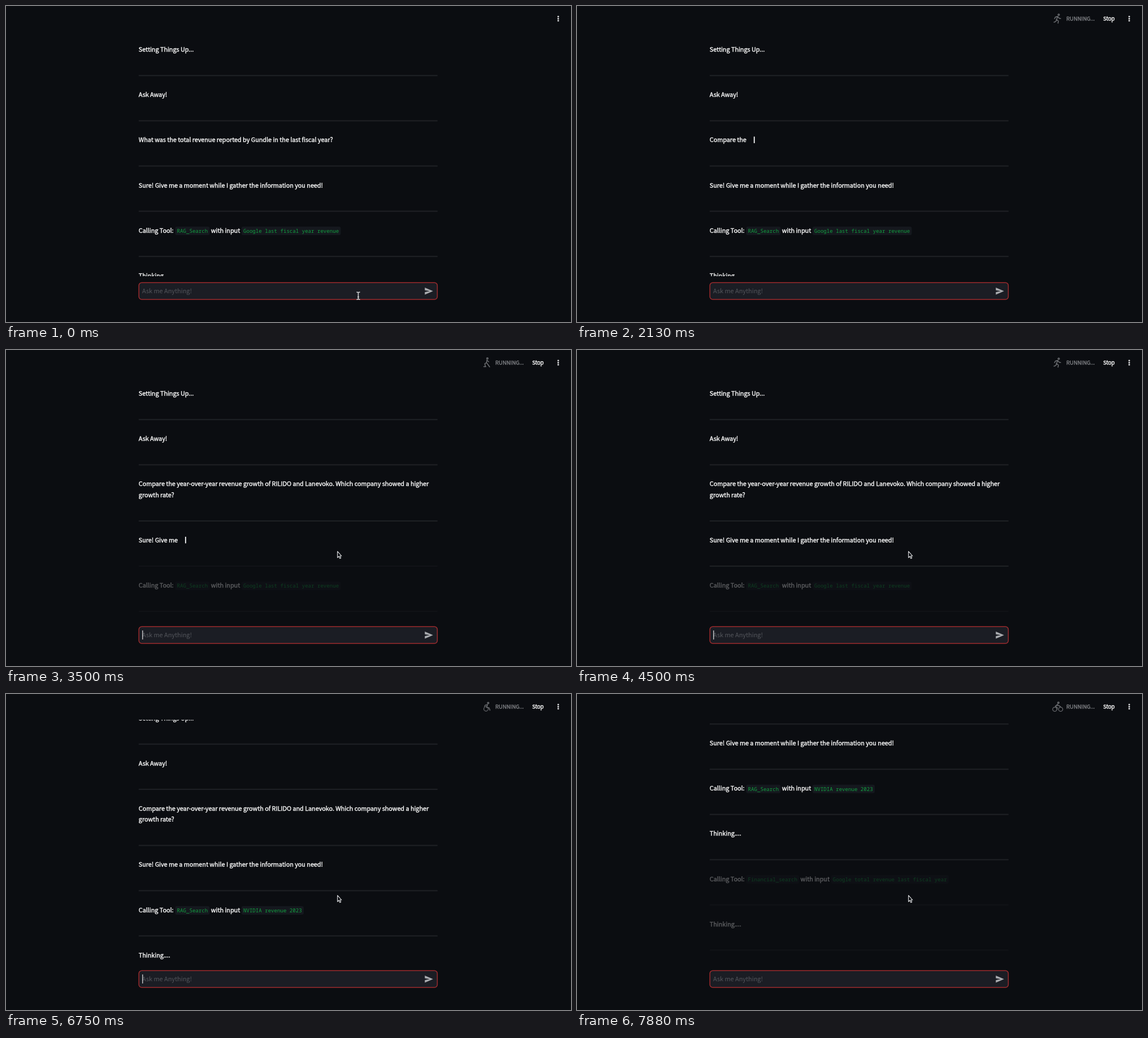
An HTML page for the animation above (8000 ms loop, 1000 by 560 pixels).

```html
<!DOCTYPE html>
<html lang="en">
<head>
<meta charset="utf-8">
<title>Chat stream</title>
<style>
  html, body { margin: 0; width: 100%; height: 100%; overflow: hidden; background: #0b0d11; }
  svg { display: block; width: 1000px; height: 560px; }
  text { font: 10.9px "Noto Sans CJK JP", "Noto Sans CJK SC", "Noto Sans CJK", "Noto Sans", sans-serif; fill: #fafafa; }
  .msg { letter-spacing: -0.06px; stroke: #fafafa; stroke-width: .38px; }
  .code { font: 9.1px "Noto Sans Mono", "DejaVu Sans Mono", monospace; fill: #12a040; }
  .chip { fill: #15181e; }
  .rule { fill: #1f2125; }
  .hint { fill: #54565c; }
  .small { font-size: 9.5px; }
  .state { fill: #85878b; stroke: #85878b; stroke-width: .3px; }
  .icon { fill: none; stroke: #6c6e72; stroke-width: 1.5; stroke-linecap: round; stroke-linejoin: round; }
</style>
</head>
<body>
<svg viewBox="0 0 1000 560">
  <defs><clipPath id="view"><rect id="window" x="0" y="45.7" width="1000" height="433"/></clipPath></defs>
  <rect width="1000" height="560" fill="#0b0d11"/>
  <g id="main">
    <g clip-path="url(#view)"><g id="chat"></g></g>
    <g id="input"></g>
  </g>
  <g id="status">
    <g id="sport" class="icon"></g>
    <text class="small state" x="866" y="26.2">RUNNING...</text>
    <text class="small msg" x="931.3" y="26.2">Stop</text>
  </g>
  <g fill="#d6d7d9">
    <circle cx="977.4" cy="18.7" r="1.5"/><circle cx="977.4" cy="22.4" r="1.5"/><circle cx="977.4" cy="26.1" r="1.5"/>
  </g>
  <g id="beam" fill="none">
    <path d="M-3 -6.5 Q0 -6.5 0 -5 Q0 -6.5 3 -6.5 M0 -5 V5 M-3 6.5 Q0 6.5 0 5 Q0 6.5 3 6.5 M-1.5 2 H1.5" stroke="#c9cacc" stroke-width="1.6"/>
  </g>
  <path id="arrow" d="M586.7 356.8 V368 L589.2 365.7 L590.9 369.6 L592.7 368.8 L591 365 H593.9 Z"
        fill="#0b0d11" stroke="#e2e3e5" stroke-width="1.1" stroke-linejoin="round"/>
</svg>
<script>
const LOOP = 8000, LEFT = 234.8, PITCH = 80.12, LINE = 19.4, WORD = 80, CHAR = 5.46, GAP = 13;
const ASK = 2030, SURE = 3330, CALL = 5400, THINK = 6400;
const SUBMIT = 1500, START = 1880;

const el = id => document.getElementById(id);
const clamp = (v, lo = 0, hi = 1) => Math.min(hi, Math.max(lo, v));
const show = (id, on) => el(id).setAttribute('display', on ? 'inline' : 'none');
const within = (t, a, b) => t >= a && t < b;

const oldAsk = 'What was the total revenue reported by Gundle in the last fiscal year?';
const newAsk = 'Compare the year-over-year revenue growth of RILIDO and Lanevoko. Which company showed a higher growth rate?'.split(' ');
const sure = 'Sure! Give me a moment while I gather the information you need!'.split(' ');
const endAsk = ASK + newAsk.length * WORD;
const endSure = SURE + sure.length * WORD;
const endCall = CALL + 8 * WORD + 20;

const cache = {};
function fill(id, html) {
  if (cache[id] === html) return false;
  el(id).innerHTML = cache[id] = html;
  return true;
}

// words on show at time t for a message streamed from "from"
const count = (t, from) => Math.floor((t - from) / WORD) + 1;
const text = (x, y, s, cls = 'msg', gap = 0) =>
  s ? `<text class="${cls}" x="${x}" y="${y}"${gap ? ` data-gap="${gap}"` : ''}>${s}</text>` : '';
const fade = (op, body) => `<g opacity="${op.toFixed(3)}">${body}</g>`;
const rule = (y, op = 1) => fade(op, `<rect class="rule" x="${LEFT}" y="${y - 1}" width="529" height="2"/>`);

function chip(x, y, s, live) {
  if (!s) return '';
  return `<rect class="chip" x="${x - 3.2}" y="${y - 10.6}" width="${s.length * CHAR + 6.4}" height="15" rx="3"/>` +
    text(x, y + .2, s, 'code', live ? GAP + 3.5 : 0);
}

function toolRow(y, tool, query, n = 99, live = false) {
  const shift = (tool.length - 10) * CHAR;
  const q = query.split(' ');
  const mark = (a, b) => live && within(n, a, b) ? GAP : 0;
  return text(LEFT, y, ['Calling', 'Tool:'].slice(0, n).join(' '), 'msg', mark(1, 3)) +
    chip(302.6, y, n > 2 ? tool : '', mark(3, 4)) +
    text(362.8 + shift, y, ['with', 'input'].slice(0, clamp(n - 3, 0, 2)).join(' '), 'msg', mark(4, 6)) +
    chip(420 + shift, y, q.slice(0, Math.max(0, n - 5)).join(' '), mark(6, 100));
}

function chat(t) {
  const stale = 1 - .67 * clamp((t - 2500) / 1000) ** 2;
  const op = from => t >= from ? 1 : stale;
  const n = count(t, ASK);
  const extra = t >= ASK && n > 14 ? LINE : 0;
  const base = i => 81.2 + i * PITCH + (i > 2 ? extra : 0);
  const line = i => 123.3 + i * PITCH + (i > 1 ? extra : 0);

  let out = text(LEFT, base(0), 'Setting Things Up...') + rule(line(0)) +
    text(LEFT, base(1), 'Ask Away!') + rule(line(1));

  if (t < ASK) out += text(LEFT, base(2), oldAsk);
  else {
    const gap = t < endAsk ? GAP : 0;
    out += text(LEFT, base(2), newAsk.slice(0, Math.min(n, 14)).join(' '), 'msg', n <= 14 ? gap : 0) +
      text(LEFT, base(2) + LINE, newAsk.slice(14, Math.max(14, n)).join(' '), 'msg', gap);
  }
  out += rule(line(2), op(endAsk));

  const said = t >= SURE ? sure.slice(0, count(t, SURE)) : sure;
  out += fade(op(SURE), text(LEFT, base(3), said.join(' '), 'msg', within(t, SURE, endSure) ? GAP : 0)) +
    rule(line(3), op(endSure));

  out += fade(op(CALL), t < CALL
    ? toolRow(base(4), 'RAG_Search', 'Google last fiscal year revenue')
    : toolRow(base(4), 'RAG_Search', 'NVIDIA revenue 2023', count(t, CALL), t < endCall)) +
    rule(line(4), op(endCall));

  out += fade(op(THINK), text(LEFT, base(5), 'Thinking....')) + rule(line(5), op(THINK));
  out += fade(stale, toolRow(base(6), 'Financial_search', 'Google total revenue last fiscal year')) + rule(line(6), stale);
  out += fade(stale, text(LEFT, base(7), 'Thinking....')) + rule(line(7), stale);

  if (!fill('chat', out)) return;
  const tail = el('chat').querySelector('[data-gap]');
  if (!tail) return;
  const x = +tail.getAttribute('x') + tail.getComputedTextLength() + +tail.dataset.gap;
  const y = +tail.getAttribute('y') - 10;
  el('chat').insertAdjacentHTML('beforeend', `<rect x="${x}" y="${y}" width="1.8" height="11.6" fill="#fafafa"/>`);
}

function input(t) {
  const typed = within(t, 880, SUBMIT);
  const grow = within(t, 1250, SUBMIT) ? LINE : 0;
  const caret = !typed && t >= 380 && (t - 380) % 1000 < 500;
  el('window').setAttribute('height', 433 - grow);
  let out = `<rect x="235.2" y="${490.2 - grow}" width="528.2" height="${29.8 + grow}" rx="5" fill="#1b1d24" stroke="#9c2b2e" stroke-width="1.5"/>`;
  if (typed) {
    out += text(241, 509.2 - grow, newAsk.slice(0, 13).join(' '), '');
    if (grow) out += text(241, 509.2, newAsk.slice(13).join(' '), '');
  } else out += text(241, 509.2, 'Ask me Anything!', 'hint');
  if (caret) out += '<rect x="241.2" y="497" width="1.2" height="16" fill="#e4e5e7"/>';
  out += `<path d="M741.3 499 L755.8 505.3 L741.3 511.6 V506.9 L750 505.3 L741.3 503.7 Z" fill="${typed ? '#fafafa' : '#a9abaf'}"/>`;
  fill('input', out);
}

const head = (x, y) => `<circle cx="${x}" cy="${y}" r="1.3"/>`;
const wheel = (x, y, r) => `<circle cx="${x}" cy="${y}" r="${r}" stroke-width="1.2"/>`;
const path = d => `<path d="${d}"/>`;
const sports = {
  R: head(852.6, 15.5) + path('M851 18.6 L848.6 24 L852 26.5 L851.4 30.5 M848.6 24 L847.6 27.4 L844.2 28.8 M851 18.6 L846.8 19.6 L845.2 22.4 M851 18.6 L853.4 21.8 L856 22.2'),
  W: head(853.4, 16) + path('M852.2 18.8 L850.6 23.8 L855 24.6 L856.6 28.8 M852.2 19 L848.2 19.8 L847 22') + wheel(849.6, 26.4, 3.9),
  S: head(852, 15) + path('M851.2 17.8 L850.4 22.4 L853.2 26 L856 30 M850.4 22.4 L847.4 24.4 L848.4 28.4 M851.2 18 L854.4 21 M845.6 29.6 H849.4'),
  B: head(852, 15.5) + path('M851 18 L846.6 21.6 L850 24 L849.6 27.4 M848.8 20 L853 20.6 L855.6 22.4') + wheel(845.6, 27, 3.7) + wheel(856, 27, 3.7)
};

function status(t) {
  show('status', t >= START);
  fill('sport', sports['WRRSSSBBBW'[Math.round((t - START + 2500) / 125) % 10]]);
}

function pointer(t) {
  show('beam', t < 630);
  el('beam').setAttribute('transform', t < 130 ? 'translate(623.5 513.6)' : 'translate(634 512)');
  show('arrow', t >= 2600);
}

function scroll(t) {
  const s = t < 6700 ? 0 : Math.min(249.7, 260 * (1 - Math.exp((6700 - t) / 358)));
  el('chat').setAttribute('transform', `translate(0 ${-s.toFixed(2)})`);
  el('main').setAttribute('transform', `translate(0 ${within(t, 2500, 3380) ? 1 : 0})`);
}

function render(t) {
  chat(t);
  input(t);
  status(t);
  pointer(t);
  scroll(t);
}

function tick() {
  render(performance.now() % LOOP);
  requestAnimationFrame(tick);
}
tick();
</script>
</body>
</html>
```
